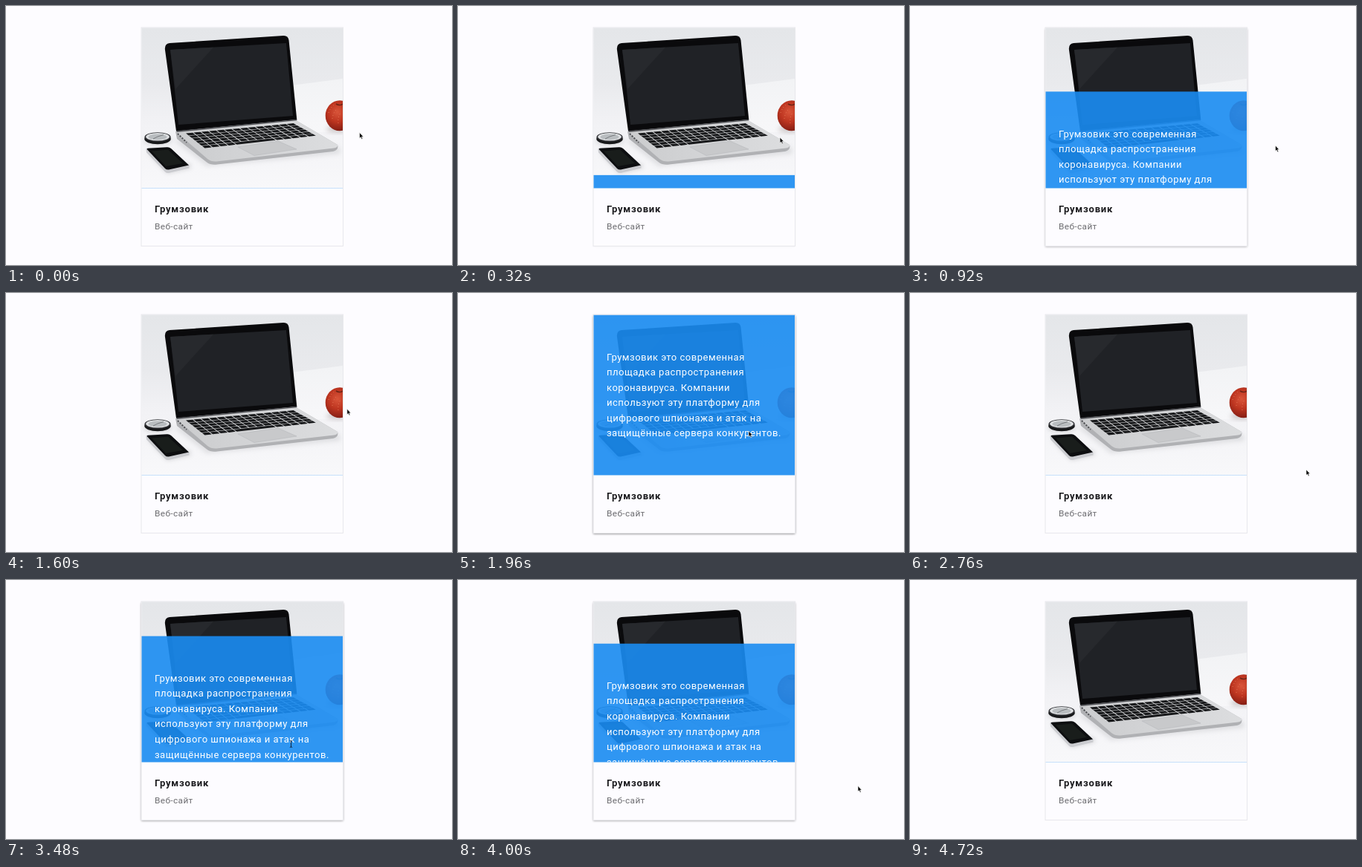
These frames come from a looping animation (600 by 349 pixels, 4.76 s). An HTML page:

```html
<!DOCTYPE html>
<html lang="ru">
<head>
<meta charset="utf-8">
<title>Карточка</title>
<style>
  html, body { margin: 0; width: 100%; height: 100%; overflow: hidden; background: #fdfcff; }
  svg { display: block; width: 100vw; height: 100vh; }
  text { font-family: Roboto, sans-serif; }
  #desc text { font-size: 13px; letter-spacing: .52px; fill: #fff; }
  .name { font-size: 13px; font-weight: 700; letter-spacing: .8px; fill: #1b1b1e; }
  .kind { font-size: 11.8px; letter-spacing: .4px; fill: #6b6b6f; }
</style>
</head>
<body>
<svg viewBox="0 0 600 349" xmlns="http://www.w3.org/2000/svg">
  <defs>
    <clipPath id="frame"><rect x="182.500" y="29.500" width="270.500" height="216"/></clipPath>
    <linearGradient id="wall" x1="0" y1="0" x2="0" y2="1">
      <stop offset="0" stop-color="#e4e6e9"/>
      <stop offset=".35" stop-color="#e9eaed"/>
      <stop offset=".6" stop-color="#f2f2f5"/>
      <stop offset="1" stop-color="#f8f8fa"/>
    </linearGradient>
    <linearGradient id="table" x1="0" y1="0" x2="0" y2="1">
      <stop offset="0" stop-color="#f2f3f5"/>
      <stop offset="1" stop-color="#f7f7f9"/>
    </linearGradient>
    <linearGradient id="metal" x1="0" y1="0" x2="1" y2="0">
      <stop offset="0" stop-color="#cbccce"/>
      <stop offset="1" stop-color="#dcdddf"/>
    </linearGradient>
    <radialGradient id="fruit" cx=".42" cy=".38" r=".65">
      <stop offset="0" stop-color="#d9553a"/>
      <stop offset=".5" stop-color="#bd3520"/>
      <stop offset="1" stop-color="#801c13"/>
    </radialGradient>
    <filter id="soft" x="-20%" y="-40%" width="140%" height="180%"><feGaussianBlur stdDeviation="3"/></filter>
    <filter id="blur" x="-5%" y="-5%" width="110%" height="110%"><feGaussianBlur stdDeviation="1.6"/></filter>
  </defs>

  <rect width="600" height="349" fill="#fdfcff"/>
  <rect id="shadow" x="182" y="31" width="271.5" height="293.5" filter="url(#blur)"/>
  <rect x="182" y="29" width="271.500" height="294.500" fill="#fdfcff" stroke="#e8e8ec"/>

  <g clip-path="url(#frame)">
    <rect x="182" y="29" width="271" height="217" fill="url(#wall)"/>
    <path d="M384 107L453 98V170H390Z" fill="url(#table)"/>
    <path d="M225 180L270 216L450 199L448 190Z" fill="#aaacb0" opacity=".3" filter="url(#soft)"/>
    <ellipse cx="447" cy="166" rx="16" ry="4" fill="#9a8f90" opacity=".5" filter="url(#soft)"/>

    <path d="M228 169L390 154L446 187Q448 194 440 196L284 213.500Q275 214.500 270 210.500L230 179Z" fill="#b0b1b4"/>
    <path d="M228 169L390 154L446 187Q447 190.500 441 191.500L283 209.500Q276 210 271 206Z" fill="url(#metal)"/>
    <path d="M231 172L243 184" stroke="#4b4c50" stroke-width="2" stroke-dasharray="2 2"/>
    <path d="M312 190L366 182L391 193L334 201.500Z" fill="#c8c9cb" stroke="#b8b9bc" stroke-width=".6"/>
    <g id="keys" fill="#17181a"></g>
    <path d="M214 59.500Q212.800 51 220 50L373 40Q379.500 39.500 380.500 46L391.300 153L229 168.700Z" fill="#0a0a0c"/>
    <path d="M229 168.300L391.300 152.700V154.200L230 170Z" fill="#535458"/>
    <path d="M221 59L377 50L386 148L232 160Z" fill="#202226"/>
    <path d="M221 59L279 55.700L228 112Z" fill="#27292d"/>

    <ellipse cx="204" cy="181" rx="18" ry="6" fill="#8d8e92" opacity=".35" filter="url(#soft)"/>
    <ellipse cx="204" cy="179" rx="17.800" ry="7.300" fill="#17181a"/>
    <ellipse cx="204" cy="176.500" rx="17.500" ry="6.300" fill="#303135"/>
    <ellipse cx="204" cy="176.300" rx="15.800" ry="5.300" fill="#dfe1e3"/>
    <ellipse cx="204" cy="176.500" rx="12.500" ry="3.900" fill="#b9bdc0"/>
    <path d="M198 179L204 176L212 173.500" fill="none" stroke="#66696d" stroke-width=".8"/>

    <path d="M190 196L217 225L248 218V214Z" fill="#85868b" opacity=".35" filter="url(#soft)"/>
    <path d="M188.500 193.500Q188.500 191 192 191L217 190Q220 190 222 192L246.500 214.500V218.500L219 225Q216 225.500 214 223.500L189 197.500Z" fill="#cbccd0"/>
    <path d="M189.500 193Q189.500 191.800 192 191.800L217 190.300Q220 190.300 222 192L246 214.500L219 220.500Q216 221 214 219Z" fill="#0d0e10"/>
    <path d="M196 195.500L218 193.500L238 212L215 216Z" fill="#191d1b"/>

    <ellipse cx="449" cy="147.700" rx="19.300" ry="20.500" fill="url(#fruit)"/>
    <path d="M434 144Q437 135 443 132M439 152Q440 143 446 138M447 158Q446 150 450 144" fill="none" stroke="#ee8a66" stroke-width=".8" stroke-dasharray="1 3"/>
    <path d="M444 132Q449 135 453 132" fill="none" stroke="#6d2416" stroke-width="1.500"/>

    <g id="desc">
      <rect x="182" y="29.500" width="272" height="217" fill="#1a8cf2" fill-opacity=".9"/>
    </g>
  </g>

  <text class="name" x="200" y="277.600">Грумзовик</text>
  <text class="kind" x="200" y="301.100">Веб-сайт</text>

  <path id="arrow" d="M0 0V7.600L1.700 6.100L2.900 8.800L4.200 8.200L3 5.600H5.200Z" fill="#050505" stroke="#fff" stroke-width=".6"/>
  <path id="beam" d="M-1.600 -4.500Q0 -4.500 0 -3.300Q0 -4.500 1.600 -4.500M0 -3.300V3.600M-1.600 4.500Q0 4.500 0 3.300Q0 4.500 1.600 4.500" fill="none" stroke="#0a0a14" stroke-width=".8"/>
</svg>
<script>
const LOOP = 4760, STEP = 40, FADE = 300, HEIGHT = 216;
const $ = id => document.getElementById(id);
const NS = "http://www.w3.org/2000/svg";

function add(parent, tag, attrs, text) {
  const el = document.createElementNS(NS, tag);
  for (const k in attrs) el.setAttribute(k, attrs[k]);
  if (text) el.textContent = text;
  parent.appendChild(el);
}

const lines = [
  "Грумзовик это современная", "площадка распространения", "коронавируса. Компании",
  "используют эту платформу для", "цифрового шпионажа и атак на", "защищённые сервера конкурентов."
];
lines.forEach((s, i) => add($("desc"), "text", { x: 200, y: 90.7 + i * 20.55 }, s));

// Keyboard: a grid of keys on a skewed quad
const keyAt = (u, v) => {
  const x = (242 + 146 * u) * (1 - v) + (268 + 151 * u) * v;
  const y = (171.5 - 13.5 * u) * (1 - v) + (192 - 17 * u) * v;
  return x.toFixed(1) + "," + y.toFixed(1);
};
function key(u0, u1, v0, v1) {
  const pts = [keyAt(u0, v0), keyAt(u1, v0), keyAt(u1, v1), keyAt(u0, v1)];
  add($("keys"), "polygon", { points: pts.join(" ") });
}
for (let r = 0; r < 6; r++) {
  const v0 = r / 6, v1 = v0 + .142;
  for (let c = 0; c < 14; c++) {
    if (r === 5 && c > 3 && c < 9) continue;
    key(c / 14, c / 14 + .062, v0, v1);
  }
  if (r === 5) key(4 / 14, 9 / 14 - .01, v0, v1);
}

// Pointer path: time, x, y
const path = [
  [0, 475.6, 170.6], [120, 474, 170], [260, 453, 174], [420, 400, 182], [600, 385, 183],
  [700, 402, 184], [788, 453, 186], [920, 491.5, 188], [1000, 504, 188], [1180, 504, 185],
  [1420, 485, 139], [1640, 453, 160], [1760, 412, 182], [1960, 391, 186], [2300, 392, 188],
  [2440, 453, 205], [2600, 520, 232], [2760, 533, 238], [3060, 532, 238], [3276, 453, 232],
  [3400, 402, 225], [3480, 383.5, 221], [3760, 385, 222], [3894, 453, 252], [4000, 538, 277.5],
  [4180, 538, 290], [4420, 537, 350]
];
const hovers = [[260, 788], [1640, 2440], [3276, 3894]];

function pointer(t) {
  let i = 1;
  while (i < path.length - 1 && path[i][0] < t) i++;
  const a = path[i - 1], b = path[i];
  const k = Math.min(1, (t - a[0]) / (b[0] - a[0]));
  return [a[1] + (b[1] - a[1]) * k, a[2] + (b[2] - a[2]) * k];
}

// CSS ease-in-out: cubic-bezier(.42, 0, .58, 1)
function ease(x) {
  if (x <= 0) return 0;
  if (x >= 1) return 1;
  let lo = 0, hi = 1, s = .5;
  for (let i = 0; i < 20; i++) {
    s = (lo + hi) / 2;
    const bx = 1.26 * s * (1 - s) ** 2 + 1.74 * s * s * (1 - s) + s ** 3;
    if (bx < x) lo = s; else hi = s;
  }
  return s * s * (3 - 2 * s);
}

const reveal = t => hovers.reduce((sum, [on, off]) =>
  sum + ease((t - on) / FADE) - ease((t - off) / FADE), 0);

function draw(t) {
  const p = reveal(t);
  $("desc").setAttribute("transform", `translate(0 ${((1 - p) * HEIGHT).toFixed(2)})`);
  $("shadow").setAttribute("opacity", (.5 * p).toFixed(3));
  const [x, y] = pointer(t), typing = t >= 3440 && t < 3800, gone = t >= 4420;
  for (const id of ["arrow", "beam"]) {
    const on = !gone && (id === "beam") === typing;
    $(id).setAttribute("visibility", on ? "visible" : "hidden");
    $(id).setAttribute("transform", `translate(${x.toFixed(1)} ${y.toFixed(1)})`);
  }
}

const start = performance.now();
function tick() {
  const t = (performance.now() - start) % LOOP;
  draw(Math.floor(t / STEP) * STEP);
  requestAnimationFrame(tick);
}
tick();
</script>
</body>
</html>
```
